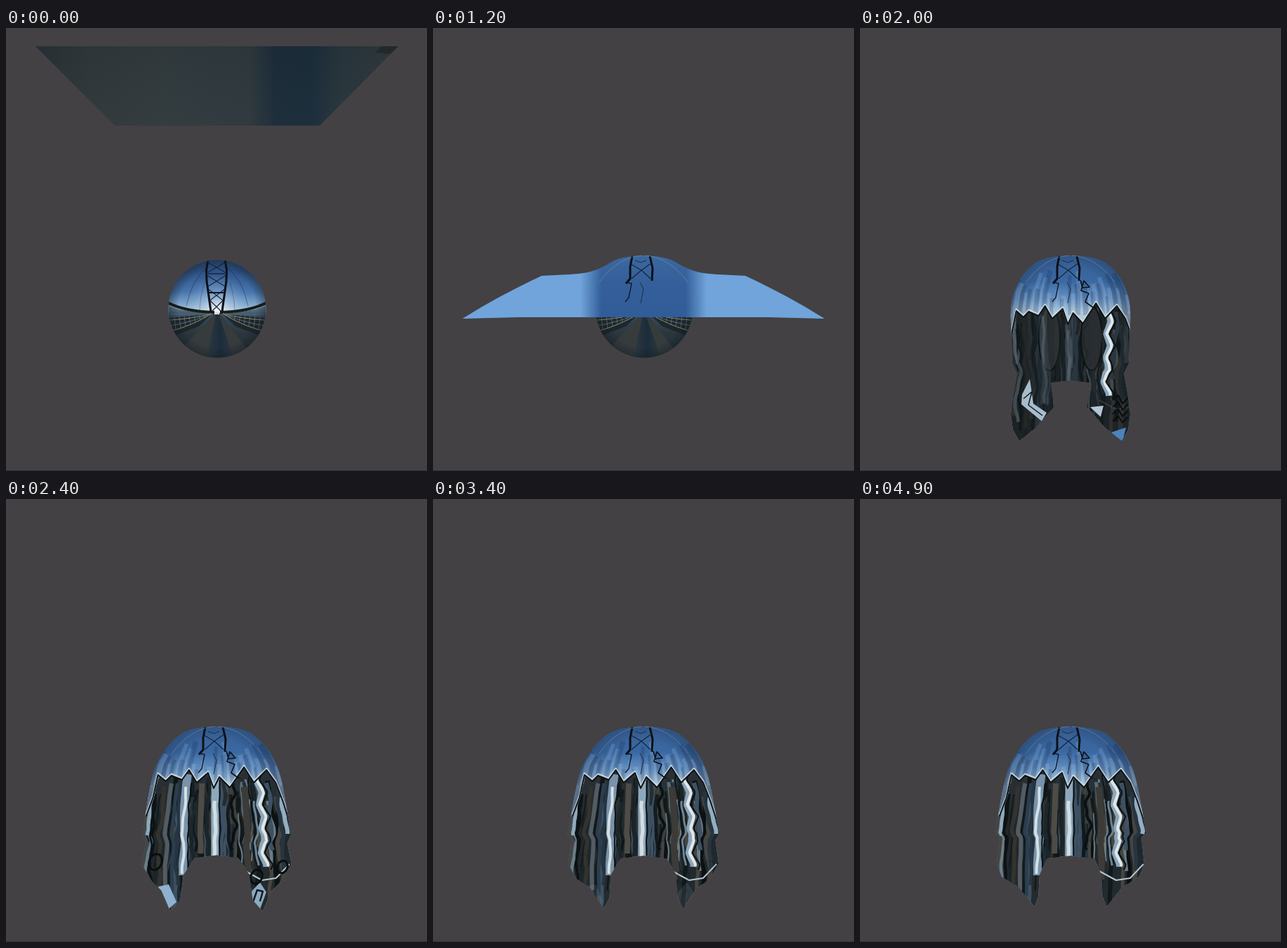
An HTML page with a canvas that plays this animation: 600 by 631 pixels, repeating every 5000 ms.

```html
<!DOCTYPE html>
<html lang="en">
<head>
<meta charset="utf-8">
<title>Cloth over a mirror ball</title>
<style>
html, body { margin: 0; width: 100%; height: 100%; overflow: hidden; background: #434143; }
canvas { display: block; }
</style>
</head>
<body>
<canvas id="stage" width="600" height="631"></canvas>
<script>
const ctx = document.getElementById('stage').getContext('2d');
const CX = 300, LOOP = 5000, STEP = 100;

const clamp = v => Math.max(0, Math.min(1, v));
const lerp = (a, b, k) => a + (b - a) * k;
const ramp = (t, a, b) => clamp((t - a) / (b - a));

let seed = 11;
const rnd = (a = 0, b = 1) => {
  seed = (seed * 16807) % 2147483647;
  return a + (b - a) * seed / 2147483647;
};
const pick = list => list[Math.floor(rnd(0, list.length))];
const make = (n, fn) => Array.from({ length: n }, (_, i) => fn(i));

// Right half of the cloth outline: x from the centre line, y.
const LANDED = [0,324, 32,325, 58,341, 80,349, 105,351, 125,352, 145,353, 160,360,
  180,370, 205,383, 230,397, 258,414, 180,412, 110,412, 50,412, 0,412];
const SPREAD = [0,324, 36,325, 62,350, 100,390, 134,426, 138,442, 135,452, 150,475,
  160,487, 185,492, 205,503, 220,517, 130,514, 65,510, 35,505, 0,508];
const CLOSED = [0,324, 38,325, 66,347, 81,375, 86,402, 84,440, 83,478, 76,492,
  82,525, 85,550, 82,572, 73,588, 50,570, 24,540, 28,505, 0,502];
const OPEN = [0,324, 38,325, 68,348, 87,378, 96,410, 105,460, 109,478, 104,490,
  110,520, 92,545, 78,556, 65,587, 52,572, 50,535, 32,512, 0,508];
const REST = [0,324, 38,325, 68,348, 87,378, 96,410, 104,455, 108,476, 101,482,
  105,520, 98,538, 74,553, 51,581, 46,566, 44,535, 34,512, 0,508];
const KEYS = [[1.2, LANDED], [1.5, SPREAD], [2, CLOSED], [2.5, OPEN], [2.8, OPEN], [4.1, REST]];

function poseAt(t) {
  let i = 0;
  while (i < KEYS.length - 2 && t >= KEYS[i + 1][0]) i++;
  const [t0, a] = KEYS[i], [t1, b] = KEYS[i + 1];
  let k = ramp(t, t0, t1);
  if (i > 0) k = 1 - Math.pow(1 - k, 1.35);
  return a.map((v, j) => lerp(v, b[j], k));
}

// Half width of the cloth at height y.
function half(p, y) {
  for (let i = 0; i < 16; i += 2) {
    if (y < p[i + 3]) return lerp(p[i], p[i + 2], ramp(y, p[i + 1], p[i + 3]));
  }
  return p[16];
}

function outline(p) {
  const path = new Path2D();
  for (const side of [1, -1]) {
    const x = i => CX + side * p[2 * i], y = i => p[2 * i + 1];
    path.moveTo(x(0), y(0));
    for (let i = 1; i < 5; i++) {
      path.quadraticCurveTo(x(i), y(i), (x(i) + x(i + 1)) / 2, (y(i) + y(i + 1)) / 2);
    }
    for (let i = 5; i < 16; i++) path.lineTo(x(i), y(i));
    path.closePath();
  }
  return path;
}

function trace(pts) {
  ctx.beginPath();
  for (let i = 0; i < pts.length; i += 2) ctx.lineTo(pts[i], pts[i + 1]);
}
function line(pts, color, w) {
  trace(pts);
  ctx.strokeStyle = color;
  ctx.lineWidth = w;
  ctx.stroke();
}
function poly(pts, color) {
  trace(pts);
  ctx.closePath();
  ctx.fillStyle = color;
  ctx.fill();
}
function curve(x0, y0, cx, cy, x1, y1, color, w) {
  ctx.beginPath();
  ctx.moveTo(x0, y0);
  ctx.quadraticCurveTo(cx, cy, x1, y1);
  ctx.strokeStyle = color;
  ctx.lineWidth = w;
  ctx.stroke();
}
function stops(g, list) {
  for (let i = 0; i < list.length; i += 2) g.addColorStop(list[i], list[i + 1]);
  return g;
}
const linear = (x0, y0, x1, y1, ...list) => stops(ctx.createLinearGradient(x0, y0, x1, y1), list);
const radial = (x, y, r0, r1, ...list) => stops(ctx.createRadialGradient(x, y, r0, x, y, r1), list);
function faded(alpha, fn) {
  if (alpha <= 0) return;
  ctx.save();
  ctx.globalAlpha = alpha;
  fn();
  ctx.restore();
}
function rect(fill, x = 0, y = 0, w = 600, h = 631) {
  ctx.fillStyle = fill;
  ctx.fillRect(x, y, w, h);
}

function ball() {
  ctx.save();
  ctx.beginPath();
  ctx.arc(301, 400, 69.5, 0, 7);
  ctx.clip();
  rect(linear(0, 330, 0, 406, 0, '#2c4d7c', .2, '#2d5186', .6, '#4775ad', .85, '#83a9cf', 1, '#c4d6e2'), 230, 330, 142, 80);
  rect(radial(301, 402, 2, 50, 0, 'rgba(245,248,245,.9)', .35, 'rgba(210,226,238,.45)', 1, 'rgba(150,185,220,0)'), 230, 340, 142, 70);
  for (const s of [-1, 1]) {
    curve(301 + s * 15, 342, 301 + s * 36, 358, 301 + s * 44, 396, 'rgba(20,32,48,.45)', 1);
    curve(301 + s * 18, 362, 301 + s * 24, 380, 301 + s * 25, 402, 'rgba(20,32,48,.3)', 1);
  }
  // Ground half
  ctx.beginPath();
  ctx.moveTo(230, 396);
  ctx.quadraticCurveTo(265, 407, 301, 406);
  ctx.quadraticCurveTo(337, 407, 372, 396);
  ctx.lineTo(372, 472);
  ctx.lineTo(230, 472);
  ctx.fillStyle = linear(0, 400, 0, 470, 0, '#587086', .18, '#34495a', .5, '#2b363c', 1, '#1d2b34');
  ctx.fill();
  for (const s of [-1, 1]) {
    curve(301 + s * 71, 391, 301 + s * 46, 404, 301 + s * 4, 405, '#171d17', 4);
    poly([301 + s * 7, 407, 301 + s * 68, 413, 301 + s * 60, 438, 301 + s * 26, 425], 'rgba(23,31,34,.75)');
    for (let i = 0; i < 4; i++) {
      curve(301 + s * 8, 407, 301 + s * 36, 409 + i * 5, 301 + s * 67, 408 + i * 8, i % 2 ? '#8e8c76' : '#526a7b', 1);
    }
    for (let i = 1; i < 8; i++) {
      const x = 301 + s * (12 + i * 7);
      line([x, 408 + i * .5, x - s * 2, 411 + i * 2.7], 'rgba(140,140,118,.55)', 1);
    }
  }
  poly([297, 407, 305, 407, 344, 458, 330, 474, 265, 474, 252, 455], '#363b3c');
  poly([299, 408, 303, 408, 326, 474, 285, 474], linear(285, 0, 326, 0, 0, '#303a40', .5, '#1c2c3b', 1, '#303a40'));
  rect('#d8d9cf', 297, 405, 7, 3);
  // Bridge arch
  const rail = y => 14 - Math.max(0, y - 355) * .14;
  for (const s of [-1, 1]) {
    line([300 + s * 12, 329, 300 + s * 14.5, 345, 300 + s * 14, 360, 300 + s * 8, 404], '#0c1017', 3);
    for (const y of [333, 352, 372, 388]) {
      line([300 - s * rail(y), y, 300 + s * rail(y + 16), y + 16], '#1a2434', 1.2);
    }
  }
  line([288, 350, 312, 350], '#1a2434', 1.3);
  line([289, 377, 310, 377], '#0e151f', 2);
  rect(radial(301, 400, 55, 70, 0, 'rgba(18,28,36,0)', 1, 'rgba(18,28,36,.45)'), 230, 330, 142, 142);
  ctx.restore();
}

// Flat cloth in free fall, seen in perspective around the horizon y = 283.
function sheet(t) {
  const front = 26 + 265 * t * t, back = 283 - (283 - front) * .56;
  const high = front < 283;
  ctx.save();
  trace([42, front, 559, front, 447, back, 155, back]);
  ctx.closePath();
  ctx.clip();
  if (high) {
    rect(linear(42, 0, 559, 0, 0, '#2a3337', .16, '#343b3e', .36, '#363e41', .59, '#323c41', .66, '#1d2e3b',
      .76, '#1b2e3d', .84, '#2b383f', 1, '#343b3e'));
    rect(linear(0, front, 0, back, 0, 'rgba(20,30,36,.2)', 1, 'rgba(40,52,58,.15)'));
    poly([535, front, 560, front, 548, lerp(front, back, .1), 526, lerp(front, back, .08)], '#23292b');
    faded(ramp(t, .35, .75), () => {
      rect(linear(130, 0, 400, 0, 0, '#2c373d', .35, '#3a4950', .7, '#414948', 1, '#303a40'));
      poly([40, front, 130, front, 198, back, 150, back], '#242b29');
      poly([398, front, 560, front, 450, back, 372, back], '#22292b');
      for (const [x, w] of [[62, 4], [84, 4], [112, 5], [136, 5], [156, 4], [174, 4], [188, 3],
        [378, 3], [392, 4], [432, 7], [453, 7], [487, 8], [514, 7], [540, 6]]) {
        line([x, front, x + (x < 300 ? 4 : -4), back], '#8a8568', w);
      }
      for (const v of [.2, .52, .84]) {
        const y = lerp(front, back, v);
        line([42, y - 5, 190, y + 3], '#4c4f42', 2);
        line([404, y + 2, 550, y - 2], '#5d5c49', 2.5);
      }
    });
  } else {
    rect(linear(0, front, 0, back, 0, '#73a5dc', 1, '#a3c4e4'));
  }
  ctx.restore();
}

// One fold following the flare of the cloth.
function fold(p, s, y0, y1, color, w, amp = 0, per = 9, phase = 0, zig = false) {
  const pts = [];
  for (let y = y0; y <= y1; y += 4) {
    const a = y / per + phase;
    const wave = zig ? Math.asin(Math.sin(a)) * .64 : Math.sin(a) + .5 * Math.sin(a * 2.3);
    pts.push(CX + s * half(p, y) + amp * wave, y);
  }
  line(pts, color, w);
}

const swells = make(30, i => ({ s: -.97 + i * .067 + rnd(-.02, .02), w: rnd(5, 12), y: rnd(345, 390), light: i % 2 }));
const cracks = make(13, i => ({ s: -.9 + i * .15, y: rnd(362, 400), len: rnd(60, 120), ph: rnd(0, 6) }));
const rings = make(34, () => ({ s: rnd(-.85, .85), y: rnd(455, 506), r: rnd(2, 8), a: rnd(0, 3), pale: rnd() < .4 }));
const TONES = ['#0c1113', '#12191c', '#1b2529', '#263541', '#33332f', '#464540', '#3d5163', '#0f1517', '#6b7c86'];
const streaks = make(84, () => ({ s: rnd(-1, 1), y: rnd(385, 450), len: rnd(50, 190), w: rnd(1.5, 7), c: pick(TONES), ph: rnd(0, 6) }));
const BORDER = [-100,452, -90,425, -83,393, -72,402, -64,394, -49,400, -39,386, -28,404, -12,390, -4,412,
  4,396, 19,411, 39,382, 53,404, 71,386, 84,404, 94,430, 102,455];

function blueFolds(p, u) {
  for (const f of swells) {
    const c = f.light ? 'rgba(140,185,232,.13)' : 'rgba(15,40,85,.16)';
    for (const m of [1.3, .75, .3]) fold(p, f.s, f.y, 505, c, f.w * m, 2, 22, f.s * 9);
  }
  for (const c of cracks) fold(p, c.s, c.y, c.y + c.len, 'rgba(10,18,32,.75)', 1.2, 2.4, 4, c.ph);
  for (const s of [.55, .66, .74]) fold(p, s, 385, 465, 'rgba(12,20,36,.7)', 1.3, 4, 3.5, s * 8, true);
  for (const r of rings) {
    ctx.beginPath();
    ctx.ellipse(CX + r.s * half(p, r.y), r.y - (1 - u) * 90, r.r, r.r * .55, r.a, 0, 7);
    if (r.pale) {
      ctx.fillStyle = 'rgba(180,208,232,.5)';
      ctx.fill();
    } else {
      ctx.strokeStyle = '#101a28';
      ctx.lineWidth = 1.2;
      ctx.stroke();
    }
  }
  for (const s of [-1, 1]) {
    line([CX + s * 128, 432, CX + s * 135, 438, CX + s * 134, 450], '#232821', 3);
    line([CX + s * 145, 476, CX + s * 158, 484, CX + s * 172, 494], '#33372b', 4);
  }
}

function opening() {
  poly([268, 512, 270, 492, 280, 470, 284, 430, 287, 470, 302, 456, 320, 470, 332, 490, 328, 508], '#a9bcc6');
  poly([274, 508, 273, 490, 284, 468, 300, 461, 317, 474, 328, 491, 325, 506], '#20282b');
  line([285, 474, 288, 496], '#46504f', 2);
  line([306, 466, 308, 496], '#3b4543', 3);
  poly([285, 520, 288, 500, 300, 498, 318, 499, 327, 508, 330, 520], '#434143');
}

function darkSkirt(p, t, k) {
  const open = ramp(t, 2, 2.4), late = ramp(t, 2.8, 4.1);
  const scale = half(p, 400) / 92, drop = (1 - k) * 120 + (1 - open) * 10;
  const edge = BORDER.map((v, i) => i % 2 ? v + drop : CX + v * scale);
  ctx.save();
  trace([...edge, 520, 480, 520, 640, 80, 640, 80, 480]);
  ctx.clip();
  rect(linear(0, 390, 0, 590, 0, '#2a3136', .4, '#1f272b', 1, '#252b2d'));
  for (const s of streaks) fold(p, s.s, s.y, s.y + s.len, s.c, s.w, lerp(2, .8, late), 14, s.ph + late);
  faded((1 - open) * .5, () => rect('#171c1e'));
  // Arched hollows left and right of the middle
  faded(1 - open * .8, () => {
    for (const s of [-1, 1]) {
      ctx.beginPath();
      ctx.ellipse(CX + s * 30, 442, 15, 46, 0, 0, 7);
      ctx.fillStyle = '#272d30';
      ctx.fill();
      ctx.strokeStyle = '#0d1214';
      ctx.lineWidth = 2;
      ctx.stroke();
    }
  });
  faded(lerp(.15, 1, open), () => {
    fold(p, -.94, 395, 482, '#8fa9bb', 5, 1);
    fold(p, -.9, 420, 530, '#0d1214', 3, 1);
    fold(p, -.69, 405, 560, '#525c62', 6, .6, 20);
    fold(p, -.6, 405, 565, '#2b3e50', 5, .6, 20);
    fold(p, -.45, 392, 536, '#7893aa', 12, 1, 24);
    fold(p, -.46, 410, 536, '#d5e0e4', 4, 1, 13);
    fold(p, -.39, 405, 525, '#0b1012', 2, 1);
    fold(p, -.22, 405, 508, '#4e4c46', 8);
    fold(p, -.02, 390, 510, '#8fa9bc', 11);
    fold(p, -.02, 430, 510, '#d3dee2', 5, .8);
    fold(p, .045, 400, 510, '#0c1113', 2, .6);
    fold(p, .24, 400, 500, '#0b1012', 4, 3, 8);
    fold(p, .42, 410, 545, '#3c3b37', 9);
    fold(p, .55, 430, 525, '#6d8494', 3, 1);
    fold(p, .95, 425, 480, '#94adc0', 6, 1);
    line([341, 530, 365, 543, 385, 540, 404, 520], '#b5c4cb', 2);
  });
  fold(p, .64, 388, 525, '#8ca6bb', 9, 3, 5.5, 1, true);
  fold(p, .66, 395, 525, '#e0e7e7', 4, 4, 5.5, 1, true);
  fold(p, .71, 388, 528, '#0b1012', 2, 5, 5.5, 1, true);
  ctx.restore();
  line(edge.map((v, i) => i % 2 ? v - 2 : v), 'rgba(215,227,233,.75)', 3);
  line(edge, '#0c1113', 2);

  faded(k * (1 - open), () => {
    poly([231, 522, 242, 500, 247, 535, 266, 548, 259, 560, 230, 536], '#a7bdcd');
    line([233, 528, 245, 518, 240, 537, 260, 552], '#101719', 1.5);
    poly([328, 540, 347, 538, 343, 554], '#b3c6d3');
    poly([358, 576, 379, 569, 374, 590], '#4b83bd');
    for (let i = 0; i < 4; i++) line([360, 530 + i * 10, 368, 523 + i * 10, 374, 535 + i * 9, 382, 527 + i * 9], '#080c0d', 2);
  });
  faded(open * (1 - ramp(t, 2.8, 3.5)), () => {
    poly([217, 552, 232, 549, 243, 574, 227, 588], '#8fb1cf');
    poly([349, 560, 362, 546, 371, 560, 361, 587, 347, 576], '#8ca9c0');
    line([352, 574, 358, 557, 366, 559, 362, 573], '#121a20', 2.5);
    for (const [x, y, r] of [[213, 517, 9], [357, 538, 8], [394, 524, 7]]) {
      ctx.beginPath();
      ctx.ellipse(x, y, r, r * 1.3, .4, 0, 7);
      ctx.strokeStyle = '#090e10';
      ctx.lineWidth = 3;
      ctx.stroke();
    }
  });
}

function drape(t) {
  const p = poseAt(t), path = outline(p);
  const u = ramp(t, 1.2, 1.5), k = ramp(t, 1.5, 1.9);
  ctx.save();
  ctx.clip(path);
  rect(linear(0, 324, 0, 517, 0, '#3c689f', .2, '#345f9a', .6, '#2f5b97', .85, '#4677b1', 1, '#6797cc'));
  const w = lerp(60, 138, u), sky = '#70a4da', none = 'rgba(112,164,218,0)';
  faded(1 - k, () => {
    rect(linear(CX - w - 30, 0, CX - w, 0, 0, sky, 1, none), 0, 320, CX);
    rect(linear(CX + w, 0, CX + w + 30, 0, 0, none, 1, sky), CX, 320, CX);
  });
  faded(u * (1 - k), () => blueFolds(p, u));
  faded(ramp(t, 1.35, 1.5) * (1 - k), opening);
  faded(k, () => {
    rect(linear(0, 324, 0, 405, 0, '#375f94', .45, '#3a68a2', .75, '#6490c0', 1, '#b0c9dd'));
    rect(radial(CX, 390, 50, 98, 0, 'rgba(20,38,66,0)', 1, 'rgba(20,38,66,.55)'));
    for (const f of swells) {
      fold(p, f.s, f.y, 410, f.light ? 'rgba(165,200,232,.2)' : 'rgba(18,38,70,.22)', f.w * .7);
    }
    darkSkirt(p, t, k);
  });

  // Arch reflected on the crown
  line([284, 325, 281, 340, 281, 357, 275, 364], '#0b1018', 3);
  line([309, 325, 313, 342, 312, 360], '#0b1018', 3);
  line([283, 357, 297, 345, 311, 335], '#17233a', 1.2);
  line([283, 337, 297, 345, 310, 357], '#17233a', 1.2);
  line([288, 331, 296, 334, 304, 331], '#1c2c48', 1);
  line([275, 362, 283, 364, 279, 384, 274, 390], '#10182a', 1.4);
  line([295, 362, 300, 372, 296, 392], '#1b2b48', 1);
  faded(k, () => line([314, 359, 317, 370, 327, 369, 319, 360, 315, 374, 326, 378, 321, 390, 332, 398], '#0c1119', 1.6));
  ctx.restore();
  ctx.save();
  ctx.beginPath();
  ctx.rect(0, 320, 600, 85);
  ctx.clip();
  curve(237, 362, 262, 327, 298, 324, 'rgba(160,180,190,.35)', 1);
  curve(363, 362, 338, 327, 302, 324, 'rgba(160,180,190,.35)', 1);
  ctx.restore();
}

function draw(t) {
  rect('#434143');
  rect('#333133', 0, 630, 600, 1);
  ctx.lineJoin = 'round';
  if (t < 1.45) ball();
  if (t < 1.15) sheet(t);
  else drape(t);
}

const start = performance.now();
function tick() {
  const ms = (performance.now() - start) % LOOP;
  draw(Math.floor(ms / STEP) * STEP / 1000);
  requestAnimationFrame(tick);
}
tick();
</script>
</body>
</html>
```
